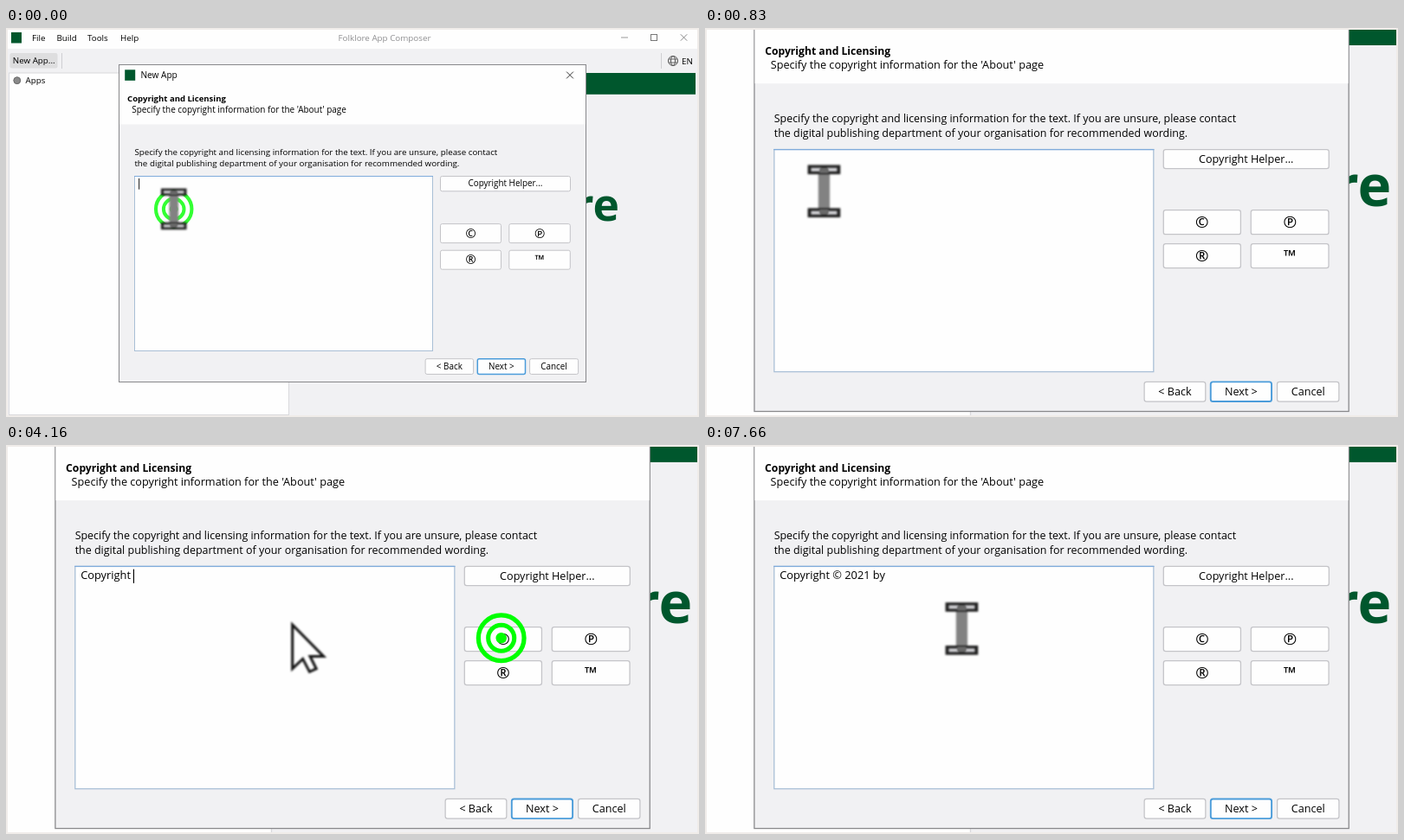
Recreate the animation shown at these times as an HTML page with a canvas. Size 800 px wide and 450 px high, loop 8 s.

```html
<!DOCTYPE html>
<html lang="en">
<head>
<meta charset="utf-8">
<title>New App wizard</title>
<style>
html, body { margin: 0; width: 100%; height: 100%; overflow: hidden; background: #f1f1f3; }
canvas { display: block; width: 800px; height: 450px; }
</style>
</head>
<body>
<canvas id="stage" width="800" height="450"></canvas>
<script>
const ctx = document.getElementById('stage').getContext('2d');
const LOOP = 8000;
const SANS = '"Open Sans", "Noto Sans", sans-serif';
const SYMBOLS = '"Noto Sans", "DejaVu Sans", sans-serif';
const WHITE = '#fefefe', GRAY = '#f1f1f3', GREEN = '#00572d', INK = '#000';

// [tick, text length, caret shown]; six ticks per second
const LINE = 'Copyright © 2021 by ';
const TYPING = [
  [0, 0, 1], [5, 0, 0], [6, 1, 1], [7, 2, 1], [9, 3, 1], [10, 4, 1], [12, 4, 0],
  [13, 5, 1], [14, 6, 1], [15, 9, 1], [17, 9, 0], [19, 10, 1], [21, 10, 0],
  [24, 10, 1], [26, 12, 1], [29, 12, 0], [31, 12, 1], [32, 12, 0], [34, 13, 1],
  [35, 14, 1], [36, 15, 1], [37, 16, 1], [38, 16, 0], [40, 17, 1], [41, 17, 0],
  [42, 18, 1], [43, 19, 1], [44, 20, 1], [46, 20, 0]
];

const START = [193.7, 209.4], TARGET = [534.8, 236.5], REST = [318.6, 228];

const clamp = v => Math.max(0, Math.min(1, v));
const smooth = v => v * v * (3 - 2 * v);
const mix = (a, b, p) => [a[0] + (b[0] - a[0]) * p, a[1] + (b[1] - a[1]) * p];

function rect(x, y, w, h, fill) {
  ctx.fillStyle = fill;
  ctx.fillRect(x, y, w, h);
}

function line(color, width, ...pts) {
  ctx.strokeStyle = color;
  ctx.lineWidth = width;
  ctx.beginPath();
  for (let i = 0; i < pts.length; i += 4) {
    ctx.moveTo(pts[i], pts[i + 1]);
    ctx.lineTo(pts[i + 2], pts[i + 3]);
  }
  ctx.stroke();
}

function text(str, x, y, { size = 9.8, weight = 400, color = INK, align = 'left', family = SANS } = {}) {
  ctx.font = `${weight} ${size}px ${family}`;
  ctx.textAlign = align;
  ctx.fillStyle = color;
  ctx.fillText(str, x, y);
}

function button(x, y, w, h, label, { edge = '#c4c4c8', width = 1, fill = WHITE, drop = 3.2, ...font } = {}) {
  ctx.beginPath();
  ctx.roundRect(x, y, w, h, 2);
  ctx.fillStyle = fill;
  ctx.fill();
  ctx.strokeStyle = edge;
  ctx.lineWidth = width;
  ctx.stroke();
  text(label, x + w / 2, y + h / 2 + drop, { size: 9.9, align: 'center', ...font });
}

function circle(x, y, r, color, width) {
  ctx.beginPath();
  ctx.arc(x, y, r, 0, 7);
  if (width) {
    ctx.strokeStyle = color;
    ctx.lineWidth = width;
    ctx.stroke();
  } else {
    ctx.fillStyle = color;
    ctx.fill();
  }
}

function cross(x, y, r, color) {
  line(color, 1, x - r, y - r, x + r, y + r, x - r, y + r, x + r, y - r);
}

function globe(x, y) {
  circle(x, y, 5.5, '#555', 1);
  ctx.beginPath();
  ctx.ellipse(x, y, 2.5, 5.5, 0, 0, 7);
  ctx.stroke();
  line('#555', .9, x - 5, y - 2, x + 5, y - 2, x - 5, y + 2, x + 5, y + 2);
}

function mainWindow() {
  rect(0, 0, 800, 450, GRAY);
  rect(0, 0, 800, 24, WHITE);
  rect(6, 5, 12, 12.5, GREEN);
  [['File', 30], ['Build', 58.5], ['Tools', 94], ['Help', 132]].forEach(([s, x]) => text(s, x, 14.7));
  text('Folklore App Composer', 437, 14.7, { color: '#8f8f91', align: 'center' });
  line('#999', 1, 710, 11, 718, 11);
  ctx.strokeStyle = '#777';
  ctx.strokeRect(744.5, 7.5, 7, 7);
  cross(782.5, 11, 3.7, '#888');

  ctx.beginPath();
  ctx.roundRect(4.5, 29, 55, 17.5, 2);
  ctx.fillStyle = '#dededf';
  ctx.fill();
  text('New App...', 7.8, 41.4);
  line('#cfcfd2', 1, 64.5, 29, 64.5, 47, 756.5, 29, 756.5, 47);
  globe(770, 38);
  text('EN', 780, 41.5);

  rect(3, 51.5, 324, 396.5, '#d9d9dc');
  rect(4, 52.5, 322, 394.5, WHITE);
  circle(12.8, 60.7, 4.2, '#8a8a8a');
  circle(12.8, 60.7, 3.9, '#666', .9);
  text('Apps', 22.5, 64.2);

  rect(327, 52, 469, 24.8, GREEN);
  text('re', 708, 223.2, { size: 51.5, weight: 700, color: GREEN, align: 'right' });
}

function dialog(tick) {
  rect(130, 42, 540, 368, '#88888b');
  rect(131, 43, 538, 366, GRAY);
  rect(131, 43, 538, 68.5, WHITE);
  rect(137.2, 48.3, 12, 12.5, GREEN);
  text('New App', 155.5, 58.2, { size: 10.1 });
  cross(651, 54.5, 3.9, '#333');
  text('Copyright and Licensing', 140.1, 85.2, { size: 9.55, weight: 700 });
  text("Specify the copyright information for the 'About' page", 145.2, 98.4, { size: 9.96 });
  text('Specify the copyright and licensing information for the text. If you are unsure, please contact', 148.4, 146.9, { size: 9.78 });
  text('the digital publishing department of your organisation for recommended wording.', 148.4, 160.4);

  rect(148.5, 171.5, 344, 202, WHITE);
  ctx.strokeStyle = '#a9bfd6';
  ctx.lineWidth = 1;
  ctx.strokeRect(148.5, 171.5, 344, 202);
  line('#7fabdb', 1, 148, 171.5, 493, 171.5);

  const [, count, caret] = TYPING.findLast(s => s[0] <= tick);
  const typed = LINE.slice(0, count);
  text(typed, 153.5, 183, { size: 10.07 });
  if (caret) rect(153.2 + ctx.measureText(typed).width, 174, .9, 12.7, '#000');

  const hover = tick === 26 || tick === 27;
  const sign = { size: 14.6, weight: 500, drop: 5.1, family: SYMBOLS };
  button(501.5, 171.5, 150, 17.3, 'Copyright Helper...');
  button(501.5, 226.6, 70, 22, '©', { ...sign, fill: hover ? '#f6f6f8' : WHITE });
  button(580.8, 226.6, 70.5, 22, '℗', sign);
  button(501.5, 257.2, 70, 22, '®', sign);
  button(580.8, 257.2, 70.5, 22, '™', sign);
  button(484.1, 382.7, 55.5, 17.8, '< Back');
  button(544.3, 382.7, 55.2, 17.8, 'Next >', { edge: '#4b9cda', width: 1.5 });
  button(604.6, 382.7, 56, 17.8, 'Cancel');
}

function rings([x, y], alpha) {
  ctx.globalAlpha = alpha;
  circle(x, y, 20.7, '#0f0', 4.1);
  circle(x, y, 11.8, '#0f0', 4);
  circle(x, y, 4.9, '#0f0');
  ctx.globalAlpha = 1;
}

function beam() {
  rect(-5.2, -20, 10.4, 40, '#828282');
  for (const side of [-1, 1]) {
    const y = side * 19.6;
    rect(-14.8, y - 4.2, 29.6, 8.4, '#202020');
    rect(-11.8, y - 1.6, 9, 3.2, '#d4d4d8');
    rect(2.8, y - 1.6, 9, 3.2, '#d4d4d8');
    rect(-2.8, y - 1.4, 5.6, 2.8, '#6a6a6a');
    rect(-4, y - side * 1.2 - 2.1, 8, 4.2, '#6a6a6a');
  }
}

function arrow() {
  const pts = [0, 0, 0, 17, 4, 13.2, 6.6, 18.2, 9.2, 17, 6.8, 12.2, 12, 12.2];
  ctx.beginPath();
  for (let i = 0; i < pts.length; i += 2) ctx.lineTo(pts[i] * 2.35 + .2, pts[i + 1] * 2.35 + 3);
  ctx.closePath();
  ctx.fillStyle = '#fff';
  ctx.fill();
  ctx.strokeStyle = '#151515';
  ctx.lineWidth = 2.4;
  ctx.stroke();
}

function pointer(tick) {
  let at = START, shape = beam;
  if (tick > 21 && tick < 28) {
    at = mix(START, TARGET, clamp((tick - 21) / 6) ** 2);
    shape = arrow;
  } else if (tick === 28) {
    at = mix(TARGET, REST, .5);
    shape = arrow;
  } else if (tick > 28) {
    at = REST;
  }
  ctx.save();
  ctx.translate(at[0], at[1]);
  ctx.filter = 'blur(0.9px)';
  shape();
  ctx.restore();
}

function draw(t) {
  const tick = Math.floor((t + 7) * .006);
  const p = smooth(clamp(tick / 6 / .85));
  const zoom = 1 + .2734 * p;
  ctx.setTransform(zoom, 0, 0, zoom, -109.3 * p, -77.9 * p);
  mainWindow();
  dialog(tick);
  if (tick < 2) rings(START, tick ? .4 : .8);
  if (tick >= 25 && tick < 28) rings(TARGET, [1, .8, .4][tick - 25]);
  pointer(tick);
  ctx.setTransform(1, 0, 0, 1, 0, 0);
  ctx.strokeStyle = '#f0ece9';
  ctx.lineWidth = 2;
  ctx.strokeRect(1, 1, 798, 448);
}

const begin = performance.now();
function loop() {
  draw((performance.now() - begin) % LOOP);
  requestAnimationFrame(loop);
}
loop();
</script>
</body>
</html>
```
